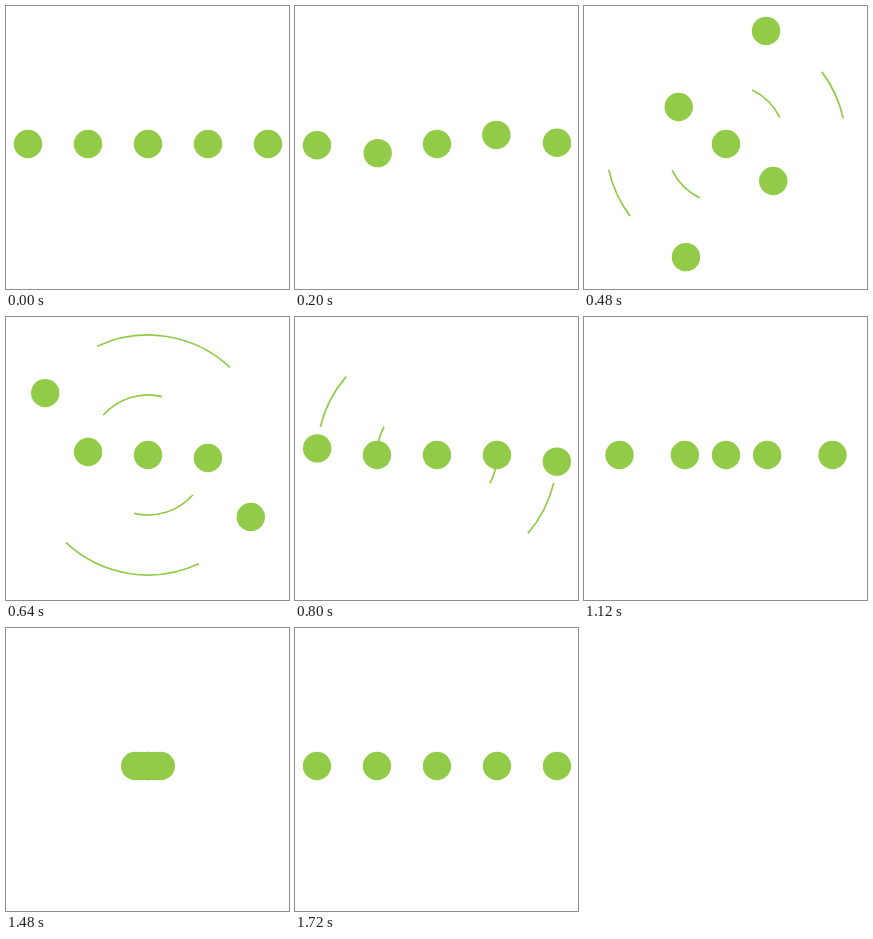
Write an HTML page that moves like this. It is 283 by 283 pixels and loops after 1760 ms.

```html
<!DOCTYPE html>
<html lang="en">
<head>
<meta charset="utf-8">
<title>Orbit loader</title>
<style>
  html, body { margin: 0; width: 100%; height: 100%; overflow: hidden; background: #fff; }
  svg { display: block; width: 100vw; height: 100vh; }
  circle { fill: #91cb48; }
  path { fill: none; stroke: #91cb48; stroke-width: 1.7; }
</style>
</head>
<body>
<svg id="stage" viewBox="0 0 283 283"></svg>
<script>
const LOOP = 1760, STEP = 40, CX = 142, CY = 138, BALL = 14.2;
const stage = document.getElementById('stage');

function add(tag, attrs = {}) {
  const el = document.createElementNS('http://www.w3.org/2000/svg', tag);
  for (const key in attrs) el.setAttribute(key, attrs[key]);
  return stage.appendChild(el);
}

// Bezier easing (x1, 0, x2, 1) from start over dur; returns 0..1
function ease(t, [start, dur, x1 = 0.556, x2 = 0.394]) {
  const x = (t - start) / dur;
  if (x <= 0) return 0;
  if (x >= 1) return 1;
  let lo = 0, hi = 1, s = 0.5;
  for (let i = 0; i < 24; i++) {
    s = (lo + hi) / 2;
    const u = 1 - s;
    if (3 * u * u * s * x1 + 3 * u * s * s * x2 + s * s * s < x) lo = s;
    else hi = s;
  }
  return s * s * (3 - 2 * s);
}

// Each timing: start ms, duration ms, x1, x2
const rings = [
  {
    radius: 60,
    spin: [80, 640],
    head: [80, 800, 0.63, 0.56],
    tail: [110, 938, 0.76, 0.49],
    close: [1000, 300],
    open: [1400, 305]
  },
  {
    radius: 120,
    spin: [160, 735],
    head: [160, 840, 0.647, 0.4],
    tail: [200, 960, 0.79, 0.3125],
    close: [1005, 429],
    open: [1400, 305]
  }
];

for (const ring of rings) {
  ring.trail = add('path');
  ring.balls = [add('circle', { r: BALL }), add('circle', { r: BALL })];
}
add('circle', { cx: CX, cy: CY, r: BALL });

// Turns 0..1 into a half circle, from the left down to the right
function polar(radius, turn, side) {
  const a = Math.PI * turn;
  return [CX - side * radius * Math.cos(a), CY + side * radius * Math.sin(a)];
}

function arc(radius, from, to, side) {
  return `M${polar(radius, from, side)}A${radius} ${radius} 0 0 0 ${polar(radius, to, side)}`;
}

function draw(t) {
  for (const ring of rings) {
    const turn = ease(t, ring.spin);
    const reach = ring.radius * (1 - ease(t, ring.close) + ease(t, ring.open));
    const head = ease(t, ring.head), tail = ease(t, ring.tail);
    [1, -1].forEach((side, i) => {
      const [x, y] = polar(reach, turn, side);
      ring.balls[i].setAttribute('cx', x);
      ring.balls[i].setAttribute('cy', y);
    });
    ring.trail.setAttribute('d', head - tail > 0.0002
      ? arc(ring.radius, tail, head, 1) + arc(ring.radius, tail, head, -1)
      : '');
  }
}

const begin = performance.now();
function tick() {
  const t = (performance.now() - begin) % LOOP;
  draw(Math.floor(t / STEP) * STEP);
  requestAnimationFrame(tick);
}
draw(0);
requestAnimationFrame(tick);
</script>
</body>
</html>
```
